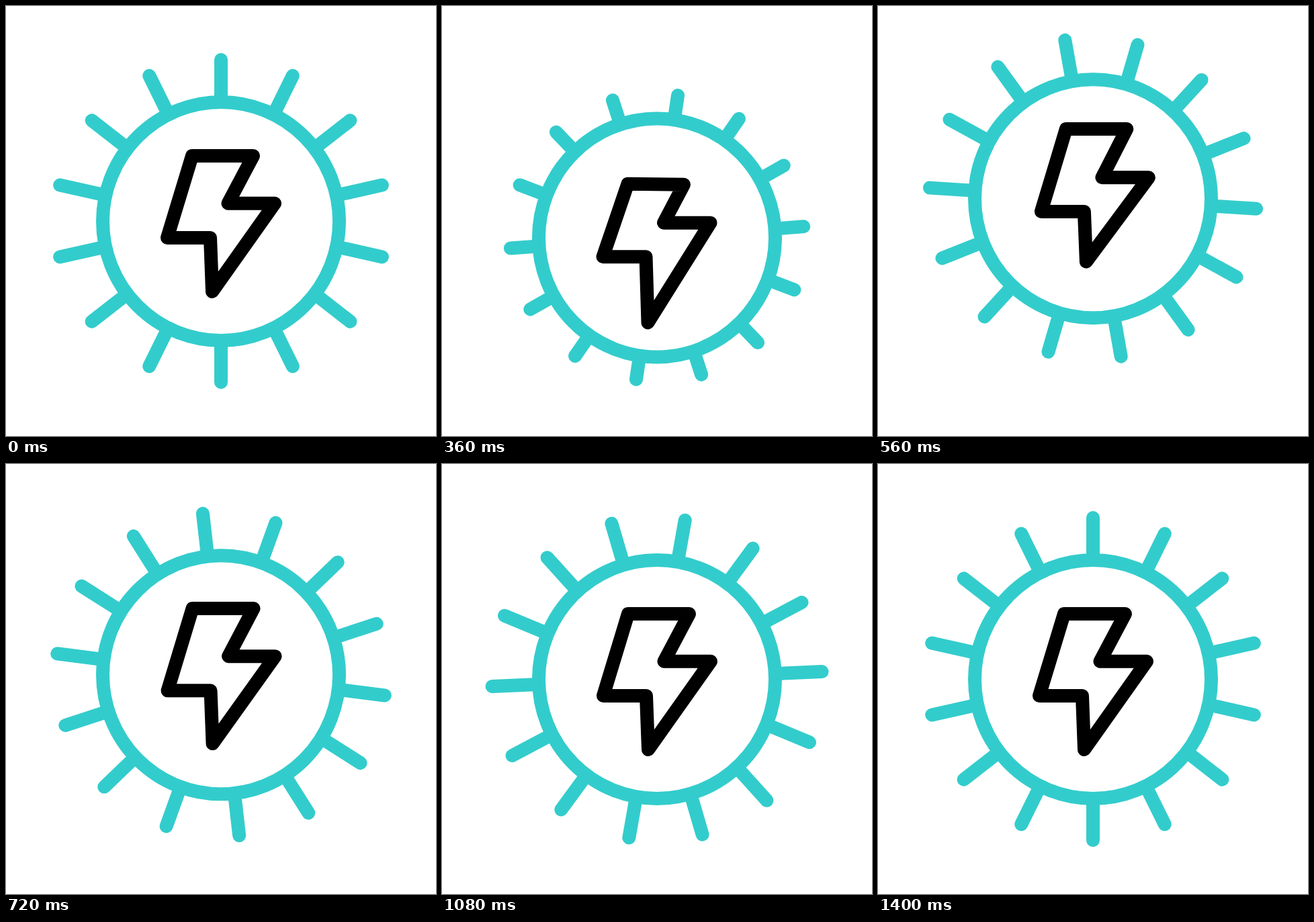
Animation, 640 px wide and 640 px high, one loop 1.48 s. Source, as an HTML page:

```html
<!DOCTYPE html>
<html lang="en">
<head>
<meta charset="utf-8">
<title>Solar energy</title>
<style>
  html, body { margin: 0; width: 100%; height: 100%; overflow: hidden; background: #fff; }
  svg { display: block; width: 100vw; height: 100vh; }
</style>
</head>
<body>
<svg viewBox="0 0 640 640" fill="none" stroke-width="20" stroke-linecap="round" stroke-linejoin="round">
  <path id="rays" stroke="#33cccc"/>
  <ellipse id="ring" cx="320" rx="176" ry="177.5" fill="#fff" stroke="#33cccc"/>
  <path id="bolt" stroke="#000"/>
</svg>
<script>
const LOOP = 1480, STEP = 40, LAST = 34, RAYS = 14;
// Key poses, counted in steps.
const CROUCH = 7, PEAK = 14.2, LAND = 18;

const rays = document.getElementById('rays');
const ring = document.getElementById('ring');
const bolt = document.getElementById('bolt');

function ease(n, from, to) {
  const u = Math.min(1, Math.max(0, (n - from) / (to - from)));
  return u * u * (3 - 2 * u);
}

const line = points =>
  'M' + points.map(([x, y]) => x.toFixed(2) + ' ' + y.toFixed(2)).join('L');

// The rays lie on an ellipse at rest, then turn and scale as one rigid group.
function rayPath(cy, size, turn) {
  const cos = Math.cos(turn), sin = Math.sin(turn);
  let d = '';
  for (let i = 0; i < RAYS; i++) {
    const a = i * 2 * Math.PI / RAYS;
    const x = 246 * Math.sin(a), y = -240 * Math.cos(a);
    const tx = x * cos - y * sin, ty = x * sin + y * cos;
    const inner = 177 / Math.hypot(tx, ty);
    d += line([inner, size].map(k => [320 + tx * k, cy + ty * k]));
  }
  return d;
}

// Four levels move up and down; top and tip travel further than the middle.
function boltPath(crouch, leap) {
  const top = 223 + 46.7 * crouch - 47 * leap;
  const notch = 293.7 + 33 * crouch - 44.2 * leap;
  const base = 345 + 32.2 * crouch - 44.7 * leap;
  const tip = 425 + 51.7 * crouch - 52.2 * leap;
  const x = 3.2 * leap - 0.7 * crouch;
  return line([
    [277 + x, top], [368 + x - 8 * crouch, top + crouch],
    [330.5 + x, notch], [400 + x, notch],
    [307 + x, tip], [304 + x, base], [240 + x, base]
  ]) + 'Z';
}

function draw(ms) {
  const n = Math.min(LAST, Math.max(0, Math.floor((ms % LOOP) / STEP) - 1));
  const up = ease(n, CROUCH, PEAK);
  const crouch = ease(n, 0, CROUCH) * (1 - up);
  const leap = up * (1 - ease(n, PEAK, LAND));
  const swing = ease(n, 0, LAND) - ease(n, LAND, LAST);
  const shift = 27.9 * crouch - 38.7 * leap;

  rays.setAttribute('d', rayPath(320 + shift, 1 - 0.116 * crouch, swing * Math.PI / 9));
  ring.setAttribute('cy', 320.5 + shift);
  bolt.setAttribute('d', boltPath(crouch, leap));
}

const start = performance.now();
function tick() {
  draw(performance.now() - start);
  requestAnimationFrame(tick);
}
draw(0);
requestAnimationFrame(tick);
</script>
</body>
</html>
```
